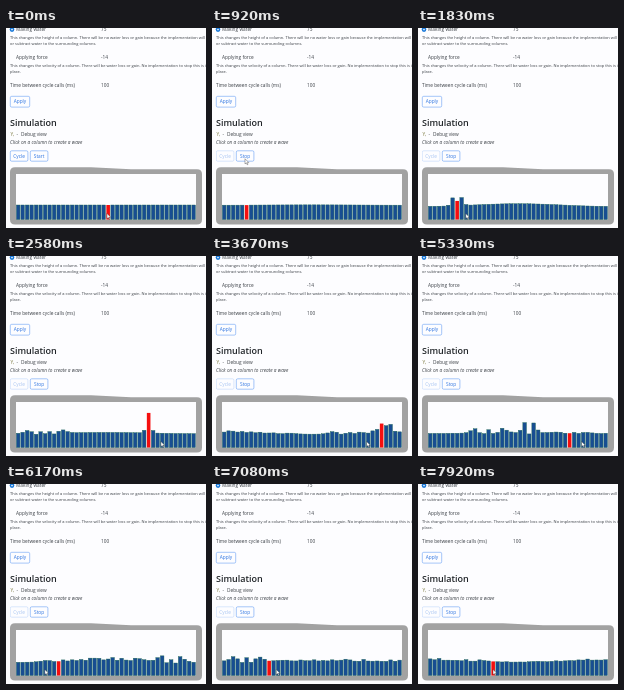
Animation of 200 by 200 pixels, one loop 8 s. Source, as an HTML page:

```html
<!DOCTYPE html>
<html lang="en">
<head>
<meta charset="utf-8">
<title>Water column simulation</title>
<style>
  html, body { margin: 0; width: 100%; height: 100%; overflow: hidden; background: #fdfdff; }
  svg { display: block; width: 100vw; height: 100vh; }
  text { font: 4.75px "Open Sans", "Noto Sans", sans-serif; fill: #3a3f45; }
  .small { font-size: 4.02px; }
  .title { font-size: 9px; font-weight: 600; fill: #212529; }
  .hint { font-style: italic; }
  .button rect { fill: #fdfdff; stroke: #4b8cf0; stroke-width: .5; }
  .button text { fill: #2a72e0; text-anchor: middle; }
  .disabled { opacity: .4; }
  .bar { fill: #184d92; stroke: #1a6350; stroke-width: .4; }
  .active { fill: #f50f0f; }
</style>
</head>
<body>
<svg viewBox="0 0 200 200">
  <circle cx="6" cy="1.6" r="2.3" fill="#1677d8"/>
  <circle cx="6" cy="1.6" r=".8" fill="#fff"/>
  <text x="10" y="3">Making water</text>
  <text x="95" y="3">75</text>
  <text class="small" x="4" y="11">This changes the height of a column. There will be no water loss or gain because the implementation will add</text>
  <text class="small" x="4" y="17.4">or subtract water to the surrounding columns.</text>
  <text x="10" y="31">Applying force</text>
  <text x="95" y="31">-14</text>
  <text class="small" x="4" y="39">This changes the velocity of a column. There will be water loss or gain. No implementation to stop this is in</text>
  <text class="small" x="4" y="45.4">place.</text>
  <text x="4" y="59.2">Time between cycle calls (ms)</text>
  <text x="95" y="59.2">100</text>
  <g class="button"><rect x="4.3" y="68.3" width="19.4" height="10.8" rx="1.4"/><text x="14" y="75.4">Apply</text></g>

  <text class="title" x="4" y="98.2">Simulation</text>
  <text x="4.5" y="108" style="fill:#77743a">Y,</text>
  <text x="10.5" y="108">-</text>
  <text x="15" y="108">Debug view</text>
  <text class="hint" x="4" y="116">Click on a column to create a wave</text>
  <g class="button" id="cycle"><rect x="4.3" y="122.8" width="17.6" height="10.4" rx="1.4"/><text x="13.1" y="129.7">Cycle</text></g>
  <g class="button"><rect x="24.3" y="122.8" width="17.6" height="10.4" rx="1.4"/><text id="toggle" x="33.1" y="129.7">Start</text></g>

  <path d="M4 144Q4 139.3 9 139.3H85L125 141.2H191Q196 141.2 196 146V191.5Q196 196.5 191 196.5H9Q4 196.5 4 191.5Z" fill="#a2a2a2"/>
  <rect x="10" y="146" width="180" height="45.5" fill="#fdfdff"/>
  <g id="bars"></g>
  <path id="cursor" d="M0 0V5.2L1.3 4.1 2.2 6 3 5.6 2.2 3.8H3.8Z" fill="#fff" stroke="#222" stroke-width=".35"/>
</svg>
<script>
const LOOP = 8000, FPS = 12, FRAMES = LOOP / 1000 * FPS, SUBSTEPS = 8;
const COLUMNS = 40, LEFT = 10, PITCH = 4.5, FLOOR = 191.5, LEVEL = 14.5;
const STIFFNESS = 22.6, DAMPING = 1.1, SPLASH = 28;
const START_AT = 800, HIGHLIGHT_LAG = 100;
const SLOSH = 1.3, SLOSH_PERIOD = 4340, SLOSH_PEAK = 1830;

// Where the pointer rests, as [time, x]; it eases from one stop to the next.
const stops = [[0, 101], [200, 101], [700, 33], [900, 33], [1600, 37.2], [2910, 175], [3470, 175],
  [4150, 69], [4700, 69], [5420, 167], [5550, 167], [6230, 36], [6500, 36], [7400, 75], [LOOP, 75]];
const clickTimes = [1620, 2480, 3460, 4540, 5028, 5540, 6350];

const byId = id => document.getElementById(id);
const ease = k => (1 - Math.cos(Math.PI * k)) / 2;
const columnAt = x => Math.floor((x - LEFT) / PITCH);

function pointerX(t) {
  const next = Math.max(1, stops.findIndex(([time]) => time >= t));
  const [t0, x0] = stops[next - 1], [t1, x1] = stops[next];
  return x0 + (x1 - x0) * ease(Math.max(0, t - t0) / (t1 - t0));
}

// The pointer leaves the water once, to press Start.
const pointerY = t => 185.5 - 57 * Math.exp(-(((t - START_AT) / 260) ** 4));

// Damped wave equation on a row of columns with reflecting walls.
function simulate() {
  const dt = 1 / FPS / SUBSTEPS, decay = Math.exp(-DAMPING * dt);
  const h = Array(COLUMNS).fill(0), v = Array(COLUMNS).fill(0), history = [];
  let clicked = 0;
  for (let step = 0; step < FRAMES * SUBSTEPS; step++) {
    if (step % SUBSTEPS === 0) history.push(h.slice());
    if (step * dt * 1000 >= clickTimes[clicked])
      h[columnAt(pointerX(clickTimes[clicked++]))] += SPLASH;
    for (let i = 0; i < COLUMNS; i++) {
      const l = h[Math.max(0, i - 1)], r = h[Math.min(COLUMNS - 1, i + 1)];
      v[i] = (v[i] + STIFFNESS * (l + r - 2 * h[i]) * dt) * decay;
    }
    for (let i = 0; i < COLUMNS; i++) h[i] = (h[i] + v[i] * dt) * decay;
  }
  return history;
}

// Slow standing wave under the splashes.
function slosh(i, t) {
  const shape = -Math.cos(2 * Math.PI * (i + .5) / COLUMNS);
  const swing = Math.cos(2 * Math.PI * (t - SLOSH_PEAK) / SLOSH_PERIOD);
  return SLOSH * Math.min(1, t / SLOSH_PEAK) * shape * swing;
}

const history = simulate();
const bars = Array.from({ length: COLUMNS }, (_, i) => {
  const bar = document.createElementNS("http://www.w3.org/2000/svg", "rect");
  bar.setAttribute("x", LEFT + i * PITCH + .35);
  bar.setAttribute("width", PITCH - .9);
  return byId("bars").appendChild(bar);
});

function draw(frame) {
  const t = frame * 1000 / FPS;
  const active = columnAt(pointerX(Math.max(0, t - HIGHLIGHT_LAG)));
  bars.forEach((bar, i) => {
    const wave = history[frame][i];
    const height = LEVEL + slosh(i, t) + (wave < 0 ? wave * .3 : wave);
    bar.setAttribute("y", FLOOR - height);
    bar.setAttribute("height", height);
    bar.setAttribute("class", i === active ? "active" : "bar");
  });
  const running = t >= START_AT;
  byId("toggle").textContent = running ? "Stop" : "Start";
  byId("cycle").classList.toggle("disabled", running);
  byId("cursor").setAttribute("transform", `translate(${pointerX(t)},${pointerY(t)})`);
}

const origin = performance.now();
function tick() {
  const t = (performance.now() - origin) % LOOP;
  draw(Math.floor(t / 1000 * FPS + .06) % FRAMES);
  requestAnimationFrame(tick);
}
tick();
</script>
</body>
</html>
```
